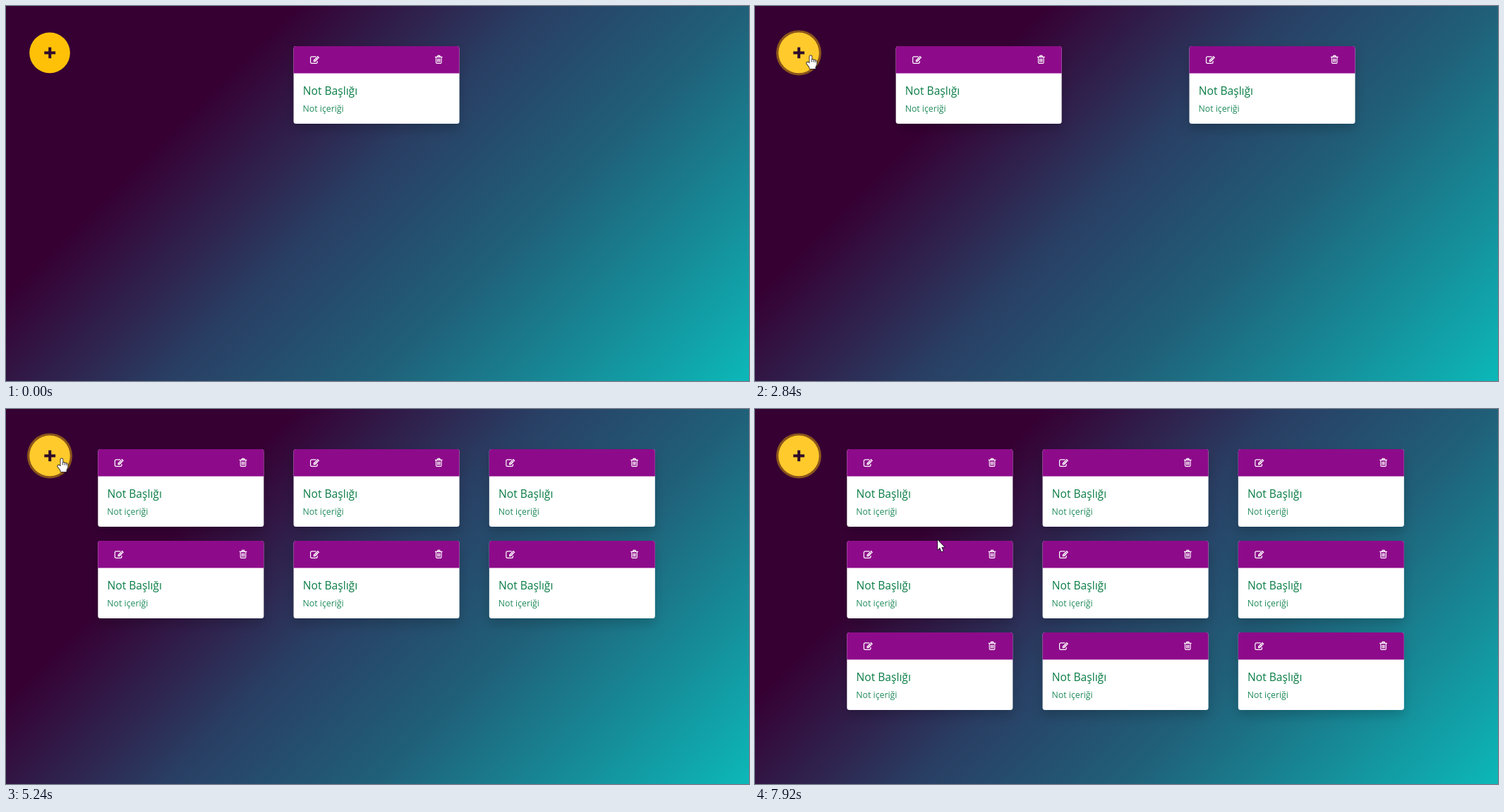
These frames come from a looping animation (1053 px wide and 532 px high, 7.99 s). An HTML page with a canvas:

```html
<!DOCTYPE html>
<html lang="tr">
<head>
<meta charset="utf-8">
<title>Notlar</title>
<style>
  html, body { margin: 0; width: 100%; height: 100%; overflow: hidden; background: #360033; }
  canvas { display: block; width: 100vw; height: 100vh; }
</style>
</head>
<body>
<canvas id="stage" width="1053" height="532"></canvas>
<script>
const W = 1053, H = 532, LOOP = 7990, STEP = 69.2;
const ctx = document.getElementById('stage').getContext('2d');

// Moments at which one more note appears, and [start, end] of each mouse press.
const ADDS = [0, 2750, 3910, 4710, 4910, 5240, 5520, 5910, 6510];
const PRESSES = [[2540, 2750], [3770, 3910], [4640, 4710], [4840, 4910],
  [5170, 5240], [5370, 5520], [5780, 5910], [6370, 6510]];

// Pointer keys: time, x, y.
const PATH = [
  [550, 931, 492], [1310, 398, 156], [1940, 94, 71], [2140, 80, 71], [2210, 79, 70],
  [6831, 79, 70], [7100, 189, 107], [7231, 189, 107], [7580, 333, 188],
  [7640, 331, 190], [7780, 275, 188], [7920, 245, 184]
];
const BTN = { x: 62, y: 66.4, r: 28.8 };

const sky = ctx.createLinearGradient(130.25, -130.25, 922.75, 662.25);
[[0, '#360033'], [.26, '#360033'], [.48, '#293f64'], [.66, '#205f78'], [1, '#0cb8b8']]
  .forEach(([at, color]) => sky.addColorStop(at, color));

const arrow = new Path2D('M0 0V13.6L3.1 10.8L5.4 16.2L7.6 15.2L5.3 10L9.4 9.7Z');
const hand = new Path2D('M-1.6 1.2Q0-.6 1.4 1.2V6.2Q3 5 4 6.8Q5.6 5.8 6.4 7.4' +
  'Q8.4 7 8.4 9.4V13L6.6 16.6V19H-1.6V17L-5.8 11.4Q-6 9.2-3.6 9.8L-1.6 11.6Z');
const sheet = new Path2D('M8.6 2.1H2.6Q.7 2.1 .7 4V9.6Q.7 11.5 2.6 11.5H8.4Q10.3 11.5 10.3 9.6V8.2');
const pencil = new Path2D('M4.9 9.4V6.9L10.8 1L13.3 3.5L7.4 9.4Z');
const binRim = new Path2D('M0 2.5H10.6M3.3 2.2L4 .7H6.7L7.3 2.2');
const binCan = new Path2D('M1.5 3V10.2Q1.5 11.6 2.8 11.6H7.8Q9.1 11.6 9.1 10.2V3M3.6 4.6V9.8M5.3 4.6V9.8M7 4.6V9.8');

function at(x, y, draw) {
  ctx.save();
  ctx.translate(x, y);
  draw();
  ctx.restore();
}

function disc(x, y, r, color) {
  ctx.fillStyle = color;
  ctx.beginPath();
  ctx.arc(x, y, r, 0, Math.PI * 2);
  ctx.fill();
}

function box(w, h, radii, color) {
  ctx.fillStyle = color;
  ctx.beginPath();
  ctx.roundRect(0, 0, w, h, radii);
  ctx.fill();
}

function text(str, x, y, font, color) {
  ctx.font = font + ' "Open Sans", "Noto Sans", sans-serif';
  ctx.fillStyle = color;
  ctx.fillText(str, x, y);
}

function editIcon() {
  ctx.lineWidth = 1.2;
  ctx.stroke(sheet);
  ctx.fillStyle = '#fff';
  ctx.fill(pencil);
  ctx.strokeStyle = '#8d0b8a';
  ctx.lineWidth = .7;
  ctx.stroke(new Path2D('M6.2 7.9L10.6 3.5M9.4 2.2L12 4.8'));
}

function binIcon() {
  ctx.lineWidth = 1.3;
  ctx.stroke(binRim);
  ctx.lineWidth = 1.1;
  ctx.stroke(binCan);
}

function note(x, y) {
  at(x, y, () => {
    ctx.save();
    ctx.shadowColor = 'rgba(0,0,0,.17)';
    ctx.shadowBlur = 16;
    ctx.shadowOffsetY = 8;
    box(235, 110, 3.5, '#fff');
    ctx.restore();
    box(235, 38.5, [3.5, 3.5, 0, 0], '#8d0b8a');
    ctx.strokeStyle = '#fff';
    at(23.3, 12.8, editIcon);
    at(200.4, 12.8, binIcon);
    text('Not Başlığı', 13.2, 69, '15.6px', '#0a7d46');
    text('Not içeriği', 13, 93, '12.3px', '#1f8a5a');
  });
}

function notes(count) {
  for (let i = 0; i < count; i++) {
    const row = Math.floor(i / 3);
    const slot = 831.75 / Math.min(3, count - row * 3);
    note(109.2 + slot * (i % 3 + .5) - 117.5, 57 + row * 130);
  }
}

function button(t, pressed) {
  const { x, y, r } = BTN;
  const ring = t < 2680 ? 0 : t < 2750 ? .3 : t < 2840 ? .7 : 1;
  if (ring) disc(x, y, r + 3.2, `rgba(217,164,6,${ring * .52})`);
  const color = t < 2140 ? '#ffc107' : pressed && t >= 2680 ? '#ffcd39' : '#ffca2c';
  disc(x, y, r, color);
  ctx.fillStyle = '#2d0a2b';
  ctx.fillRect(54.3, 64.4, 15.8, 4);
  ctx.fillRect(60.2, 58.6, 4, 15.6);
  if (pressed) disc(77.5, 69.5, 9.4, 'rgba(255,228,10,.75)');
}

// The pointer is sampled in even ticks, so it moves in small jumps.
function pointer(t) {
  if (t < 550) return;
  const start = t < 6900 ? 550 : t < 7300 ? 6900 : 7300;
  const tick = start + Math.floor((t - start) / STEP + .02) * STEP;
  const last = PATH[PATH.length - 1];
  let i = PATH.findIndex(key => key[0] > tick);
  let x = last[1], y = last[2];
  if (i > 0) {
    const [t0, x0, y0] = PATH[i - 1], [t1, x1, y1] = PATH[i];
    const p = (tick - t0) / (t1 - t0);
    x = x0 + (x1 - x0) * p;
    y = y0 + (y1 - y0) * p;
  }
  const over = t >= 2140 && Math.hypot(x - BTN.x, y - BTN.y) < BTN.r;
  at(Math.round(x), Math.round(y), () => {
    const shape = over ? hand : arrow;
    ctx.lineJoin = 'round';
    ctx.lineWidth = 1.6;
    ctx.strokeStyle = '#15101a';
    ctx.stroke(shape);
    ctx.fillStyle = '#fff';
    ctx.fill(shape);
    if (over) {
      ctx.lineWidth = .8;
      ctx.stroke(new Path2D('M1.4 5.5V9.5M4 6.8V9.8M6.4 7.4V10'));
    }
  });
}

function frame(now) {
  const t = now % LOOP;
  const pressed = PRESSES.some(([from, to]) => t >= from && t < to);
  ctx.fillStyle = sky;
  ctx.fillRect(0, 0, W, H);
  notes(ADDS.filter(time => time <= t).length);
  button(t, pressed);
  pointer(t);
  requestAnimationFrame(frame);
}
requestAnimationFrame(frame);
</script>
</body>
</html>
```
